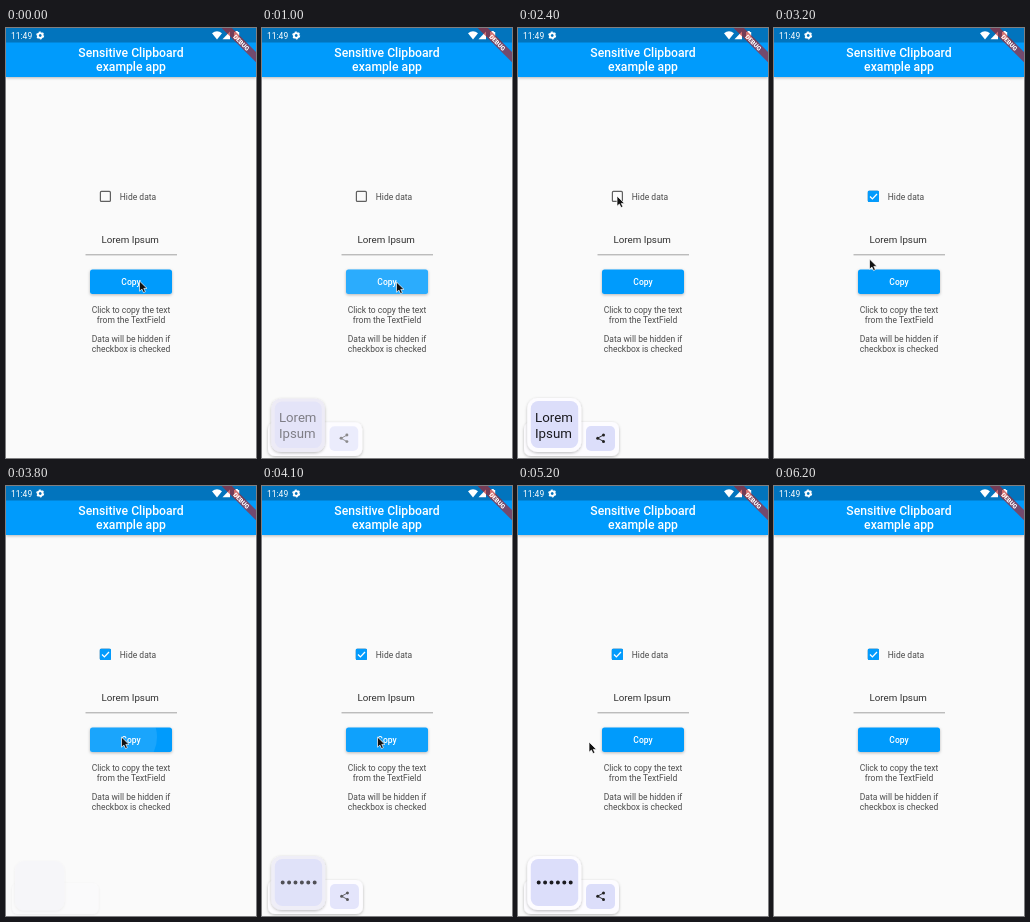
Write an HTML page that moves like this. It is 250x430 px and loops after 6.4 s.

```html
<!DOCTYPE html>
<html lang="en">
<head>
<meta charset="utf-8">
<title>Clipboard demo</title>
<style>
html, body { margin: 0; width: 100%; height: 100%; overflow: hidden; background: #fafafa; }
svg { display: block; width: 100vw; height: 100vh; }
text { font-family: Roboto, sans-serif; font-size: 8.5px; fill: #4b4b4b; }
.mid { text-anchor: middle; }
.title { font-size: 12.2px; font-weight: 500; fill: #fff; }
.light { fill: #fff; }
.clip { font-size: 13.3px; fill: #1b1b20; }
</style>
</head>
<body>
<svg viewBox="0 0 250 430" xmlns="http://www.w3.org/2000/svg">
  <defs>
    <filter id="soft" x="-30%" y="-30%" width="160%" height="170%">
      <feDropShadow dx="0" dy="1" stdDeviation="1.5" flood-opacity=".27"/>
    </filter>
    <clipPath id="buttonClip"><rect x="84" y="241.5" width="82" height="24.5" rx="2.5"/></clipPath>
  </defs>
  <rect width="250" height="430" fill="#fafafa"/>

  <rect y="14" width="250" height="35" fill="#039bfc" filter="url(#soft)"/>
  <rect width="250" height="14.5" fill="#0274bd"/>
  <text class="title mid" x="125" y="29.4">Sensitive Clipboard</text>
  <text class="title mid" x="125" y="43.4">example app</text>

  <text class="light" x="5" y="10.5">11:49</text>
  <g transform="translate(34.2 7.5)">
    <circle r="2.3" fill="none" stroke="#fff" stroke-width="1.8"/>
    <circle r="3.4" fill="none" stroke="#fff" stroke-width="1.2" stroke-dasharray="1.9 1.66"/>
  </g>
  <g fill="#fff">
    <path d="M206 5.2Q211 1.2 216 5.2L211 11.4Z"/>
    <path d="M216.5 11.3L224 3.4V11.3Z"/>
    <path d="M228 4h1.4v-1h2.4v1h1.4v7.5H228Z"/>
  </g>
  <g transform="translate(250 0) rotate(45)">
    <rect x="-24.3" y="17" width="48.6" height="7.3" fill="#b71c1c" opacity=".63"/>
    <text class="light mid" y="22.9" style="font-size:6.2px;font-weight:900">DEBUG</text>
  </g>

  <rect x="94.4" y="163.4" width="10" height="10" rx="1" fill="none" stroke="#606060" stroke-width="1.2"/>
  <g id="check">
    <rect x="93.8" y="162.8" width="11.2" height="11.2" rx="1" fill="#039bfc"/>
    <path d="M96 168.5l2.4 2.4 4.6-4.9" fill="none" stroke="#fff" stroke-width="1.3"/>
  </g>
  <text x="113.8" y="171.5">Hide data</text>
  <text class="mid" x="124.2" y="215.3" style="font-size:9.75px;fill:#303030">Lorem Ipsum</text>
  <path d="M79.5 226.8H171" stroke="#8c8c8c" stroke-width=".8"/>

  <rect x="84" y="241.5" width="82" height="24.5" rx="2.5" fill="#039bfc" filter="url(#soft)"/>
  <g clip-path="url(#buttonClip)"><circle id="ripple" fill="#fff"/></g>
  <text class="light mid" x="125" y="256.7" style="font-weight:500">Copy</text>
  <text class="mid" x="125" y="285">Click to copy the text</text>
  <text class="mid" x="125" y="294.6">from the TextField</text>
  <text class="mid" x="125" y="314">Data will be hidden if</text>
  <text class="mid" x="125" y="323.7">checkbox is checked</text>

  <g id="popup">
    <rect x="6" y="394" width="95" height="34" rx="7" fill="#fdfcff" filter="url(#soft)"/>
    <rect id="card" x="9.3" y="370" width="54" height="54" rx="10" filter="url(#soft)"/>
    <g id="content">
      <rect x="12.8" y="373" width="47.4" height="47" rx="7.5" fill="#dcdefa"/>
      <rect x="68" y="398" width="29" height="25" rx="5" fill="#dcdefa"/>
      <path d="M85.7 406.9L79.6 410.2l6.1 3.3" fill="none" stroke="#222" stroke-width=".9"/>
      <g fill="#222">
        <circle cx="85.5" cy="406.9" r="1.5"/><circle cx="79.7" cy="410.2" r="1.5"/><circle cx="85.5" cy="413.5" r="1.5"/>
      </g>
      <g id="plain">
        <text class="clip" x="17" y="394">Lorem</text>
        <text class="clip" x="17" y="410">Ipsum</text>
      </g>
      <path id="dots" d="M20.7 396.4H54" stroke="#1b1b20" stroke-width="4" stroke-linecap="round" stroke-dasharray="0 6.4"/>
    </g>
  </g>

  <path id="cursor" d="M0 0V10.2L2.4 8.1 4 11.6 5.9 10.7 4.3 7.4H7.5Z" fill="#111" stroke="#fff" stroke-width=".7" stroke-linejoin="round"/>
</svg>
<script>
const LOOP = 6400;
const $ = id => document.getElementById(id);
const mix = (a, b, k) => a + (b - a) * k;
const ramp = (t, a, b) => Math.min(1, Math.max(0, (t - a) / (b - a)));
const ease = k => k * k * (3 - 2 * k);
const show = (id, on) => $(id).setAttribute("opacity", +on);

// time, x, y of the pointer tip
const route = [
  [0, 133.5, 253], [100, 133.5, 253], [200, 134.5, 254], [1350, 134.5, 254],
  [1700, 95.5, 248.5], [2150, 99, 168], [2950, 99, 168], [3200, 95.5, 231],
  [3600, 115.5, 251], [4450, 115.5, 251], [5100, 72, 256], [5200, 71, 256], [LOOP, 71, 256]
];
const popups = [
  { start: 750, end: 2420, hidden: false },
  { start: 3780, end: 5620, hidden: true }
];
const taps = [{ start: 720, peak: .17 }, { start: 3700, peak: .1 }];

function pointer(t) {
  const i = Math.max(1, route.findIndex(p => p[0] > t));
  const [a, b] = [route[i - 1], route[i]];
  const k = ease(ramp(t, a[0], b[0]));
  return [mix(a[1], b[1], k), mix(a[2], b[2], k)];
}

function drawPopup(t) {
  const p = popups.find(p => t >= p.start && t < p.end + 380);
  show("popup", 0);
  if (!p) return;
  const out = t - p.end;
  const grow = out > 0 ? 1 - ramp(out, 0, 380) : 1 - (1 - ramp(t, p.start, p.start + 350)) ** 2;
  const body = ramp(t, p.start, p.start + 90) * (1 - ramp(out, 220, 380));
  const fill = ramp(t, p.start + 90, p.start + 400) * (1 - ramp(out, 0, 260));
  const s = mix(.9, 1, grow);
  show("popup", body);
  show("content", fill);
  show("plain", !p.hidden);
  show("dots", p.hidden);
  $("popup").setAttribute("transform", `translate(6 428) scale(${s}) translate(-6 -428)`);
  const c = ramp(fill, .7, 1);
  $("card").setAttribute("fill", `rgb(${mix(237, 253, c)},${mix(235, 252, c)},${mix(246, 255, c)})`);
}

function drawRipple(t, [x, y]) {
  const tap = taps.find(p => t >= p.start && t < p.start + 580);
  show("ripple", 0);
  if (!tap) return;
  const age = t - tap.start;
  show("ripple", tap.peak * ramp(age, 0, 80) * (1 - ramp(age, 300, 550)));
  const r = $("ripple");
  r.setAttribute("cx", x);
  r.setAttribute("cy", y);
  r.setAttribute("r", mix(8, 90, ease(ramp(age, 0, 260))));
}

function draw(t) {
  const at = pointer(t);
  $("cursor").setAttribute("transform", `translate(${at})`);
  show("cursor", t < 5900);
  show("check", ramp(t, 2420, 2580));
  drawRipple(t, at);
  drawPopup(t);
}

const begin = performance.now();
function tick() {
  draw((performance.now() - begin) % LOOP);
  requestAnimationFrame(tick);
}
draw(0);
tick();
</script>
</body>
</html>
```
